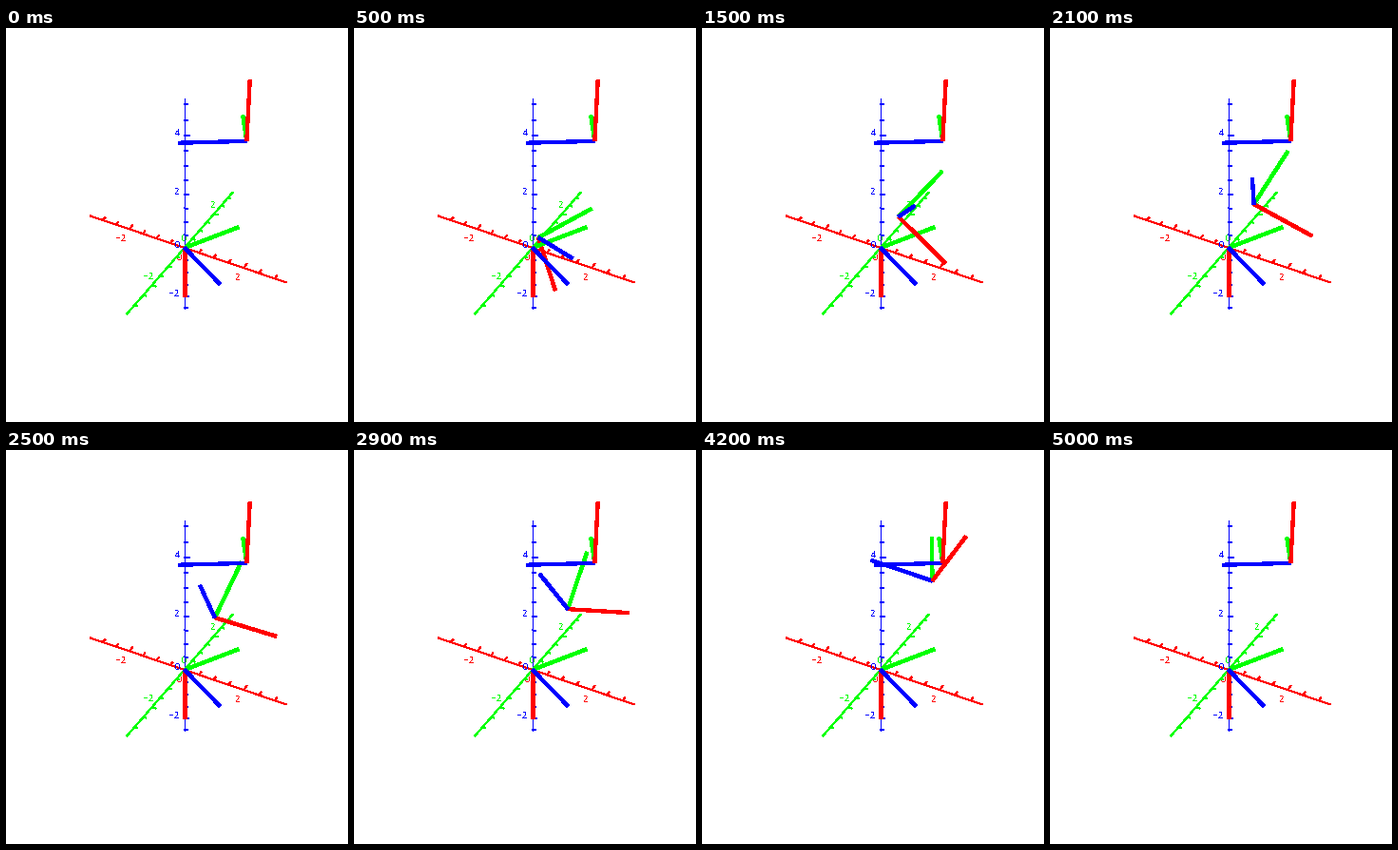
A matplotlib script for the animation above (5100 ms loop, 360 by 414 pixels).

```python
import numpy as np
import matplotlib.pyplot as plt
from matplotlib.animation import FuncAnimation

# At 72 dpi one point is one pixel
W, H, DPI = 360, 414, 72
STEPS, INTERVAL = 50, 100

# Perspective camera: screen right, screen up and depth as world vectors
CENTER = np.array([187.8, 231.0])
RIGHT = np.array([30.1, 16.3, 0.0])
UP = np.array([-10.2, 18.7, 26.7])
NEAR = np.array([0.0166, -0.022, 0.0235])

Y_MAX = 3.28
COLORS = ["#ff0000", "#00ff00", "#0000ff"]

# Columns are the red, green and blue arms of the starting frame
START = 2 * np.array([[0, 0.5, np.sqrt(0.75)],
                      [0, np.sqrt(0.75), -0.5],
                      [-1, 0, 0]])
GOAL = np.array([1.0, 2.0, 3.0])

plt.rcParams["text.antialiased"] = False
fig = plt.figure(figsize=(W / DPI, H / DPI), dpi=DPI, facecolor="white")
ax = fig.add_axes([0, 0, 1, 1])
ax.set(xlim=(0, W), ylim=(H, 0))
ax.axis("off")


def project(p):
    w = 1 - NEAR @ p
    return CENTER + np.array([RIGHT @ p, -(UP @ p)]) / w


def segment(p, q, color, width, **kw):
    a, b = project(p), project(q)
    return ax.plot([a[0], b[0]], [a[1], b[1]], color=color, lw=width,
                   antialiased=False, solid_capstyle="butt", **kw)[0]


def draw_axis(k, lo, hi, tick, shift, labels):
    unit = np.eye(3)[k]
    color = COLORS[k]
    segment(lo * unit, hi * unit, color, 1, zorder=1)
    for v in np.arange(np.ceil(lo * 2), np.floor(hi * 2) + 1) / 2:
        size = 1.4 if v % 2 == 0 else 1
        segment(v * unit, v * unit + size * np.array(tick), color, 1, zorder=1)
    for v in labels:
        x, y = project(v * unit) + shift
        ax.text(x, y, str(v).replace("-", "\u2212"), color=color,
                family="Liberation Serif", size=10.5,
                ha="right", va="center_baseline", zorder=1)


def pose(t):
    """Origin and arms after a share t of the half turn about the y axis."""
    c, s = np.cos(np.pi * t), np.sin(np.pi * t)
    turn = np.array([[c, 0, -s], [0, 1, 0], [s, 0, c]])
    return GOAL * t, turn @ START


def arm_ends(origin, arm):
    if origin[1] + arm[1] > Y_MAX:
        arm = arm * (Y_MAX - origin[1]) / arm[1]
    return origin, origin + arm


def depth(p, q):
    return 3 + NEAR @ (p + q) / 2


def add_frame(t):
    origin, arms = pose(t)
    lines = []
    for arm, color in zip(arms.T, COLORS):
        p, q = arm_ends(origin, arm)
        lines.append(segment(p, q, color, 3.3, zorder=depth(p, q)))
    return lines


draw_axis(0, -3.48, 3.36, (0, 0.17, 0), (-3, 9.5), (-2, 0, 2))
draw_axis(1, -3.45, 3.36, (0.1, 0, 0), (2, -10), (-2, 0, 2))
draw_axis(2, -2.53, 5.16, (0.09, 0.045, 0), (-5, -3.5), (-2, 0, 2, 4))

add_frame(0)
add_frame(1)
moving = add_frame(0)


def update(i):
    origin, arms = pose(i / STEPS)
    for line, arm in zip(moving, arms.T):
        p, q = arm_ends(origin, arm)
        line.set_data(*np.transpose([project(p), project(q)]))
        line.set_zorder(depth(p, q))
    return moving


anim = FuncAnimation(fig, update, frames=STEPS + 1, interval=INTERVAL,
                     repeat=True, repeat_delay=0, blit=False)
plt.show()
```
